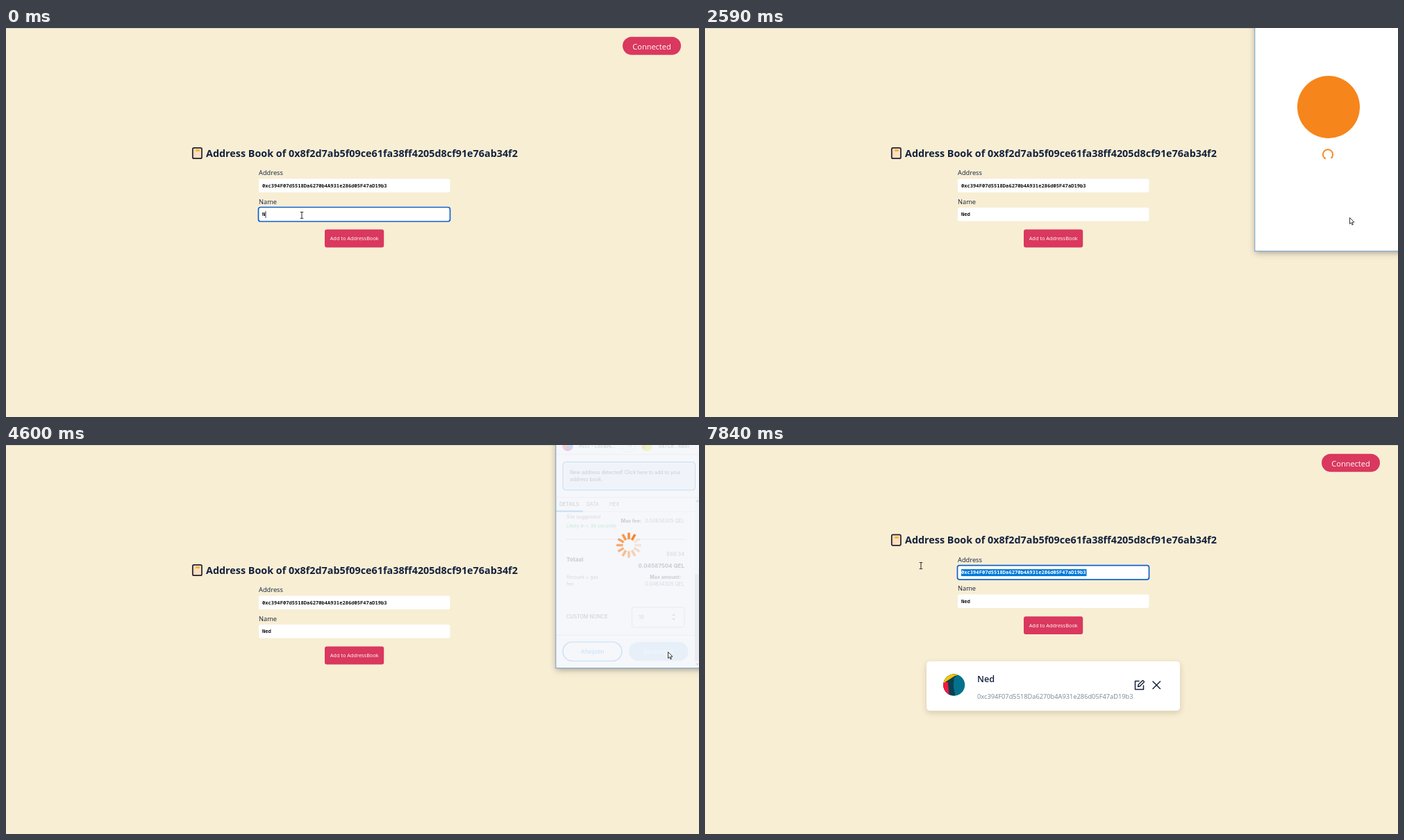
An HTML page with a canvas that plays this animation: 998 px wide and 561 px high, repeating every 7.99 s.

```html
<!DOCTYPE html>
<html lang="en">
<head>
<meta charset="utf-8">
<title>Address Book</title>
<style>
  html, body { margin: 0; width: 100%; height: 100%; overflow: hidden; background: #f8eed4; }
  canvas { display: block; }
</style>
</head>
<body>
<canvas id="stage" width="998" height="561"></canvas>
<script>
const ctx = document.getElementById('stage').getContext('2d');
const LOOP = 7990, TAU = Math.PI * 2;
const SANS = '"Open Sans", "Noto Sans", sans-serif';
const MONO = '600 7.14px "Noto Sans Mono", "DejaVu Sans Mono", monospace';
const INTER = 'Inter, Lato, sans-serif';
const NAVY = '#14213d', PINK = '#da385e', BLUE = '#1c7fd3', ORANGE = '#f6851b';

const OWNER = '0x8f2d7ab5f09ce61fa38ff4205d8cf91e76ab34f2';
const ENTRY = '0xc394F07d5518Da6270b4A931e286d05F47aD19b3';
const NAME = 'Ned';

const AT = { open: 1790, logo: 2180, details: 2740, busy: 4240, close: 4730, saved: 4870, select: 7840 };

// time, x, y, kind: i = text beam, a = arrow, h = hand, - = hidden
const POINTER = [
  [0, 426, 270, 'i'], [670, 430, 272, 'i'], [820, 446, 275, 'i'], [940, 468, 282, 'a'],
  [1090, 488, 296, 'h'], [1240, 495, 302, 'h'],
  [1920, 600, 299, 'a'], [2050, 700, 291, 'a'], [2180, 800, 284, 'a'], [2310, 870, 279, 'a'],
  [2440, 915, 275, 'a'], [2590, 928, 273, 'a'],
  [3110, 937, 274, 'i'], [3410, 942, 280, 'a'], [3560, 950, 292, 'a'], [3710, 953, 298, 'h'],
  [4240, 953, 298, 'a'], [5270, 800, 316, 'a'], [5450, 568, 348, 'a'], [5630, 0, 0, '-'],
  [6780, 128, 218, 'a'], [6930, 220, 210, 'a'], [7080, 330, 203, 'a'], [7230, 440, 195, 'a'],
  [7390, 520, 188, 'i'], [7540, 567, 182, 'i'], [7690, 553, 184, 'i'], [7840, 311, 174, 'i']
];
const SCROLL = [[0, 0], [3110, 40], [3260, 90], [3410, 140], [3560, 167]];

const latest = (list, t) => list.filter(k => k[0] <= t).pop();

function text(str, x, y, font, color, align = 'left') {
  ctx.font = font;
  ctx.fillStyle = color;
  ctx.textAlign = align;
  ctx.fillText(str, x, y);
}

function rect(x, y, w, h, color) {
  ctx.fillStyle = color;
  ctx.fillRect(x, y, w, h);
}

function box(x, y, w, h, r, fill, stroke, width = 1) {
  ctx.beginPath();
  ctx.roundRect(x, y, w, h, r);
  if (fill) { ctx.fillStyle = fill; ctx.fill(); }
  if (stroke) { ctx.strokeStyle = stroke; ctx.lineWidth = width; ctx.stroke(); }
}

function poly(points, fill, stroke, width = 1, closed = true) {
  ctx.beginPath();
  points.forEach(([x, y]) => ctx.lineTo(x, y));
  if (closed) ctx.closePath();
  if (fill) { ctx.fillStyle = fill; ctx.fill(); }
  if (stroke) { ctx.strokeStyle = stroke; ctx.lineWidth = width; ctx.stroke(); }
}

function disc(x, y, r, fill, stroke) {
  ctx.beginPath();
  ctx.arc(x, y, r, 0, TAU);
  ctx.fillStyle = fill;
  ctx.fill();
  if (stroke) { ctx.strokeStyle = stroke; ctx.lineWidth = 1; ctx.stroke(); }
}

function shadowed(color, blur, dy, draw) {
  ctx.save();
  ctx.shadowColor = color;
  ctx.shadowBlur = blur;
  ctx.shadowOffsetY = dy;
  draw();
  ctx.restore();
}

function notebook() {
  box(268.8, 172.8, 13.2, 15.4, 2, '#fbe0c4', '#24202c', 1.7);
  rect(270.2, 174, 1.2, 13, '#f3cdb0');
  box(273, 175.3, 6, 2.8, 1, '#f5b820');
}

function field(y, value, focused, selected, caret) {
  box(364, y, 275.4, 19.5, 2.5, '#fff');
  if (focused) box(363.5, y - 0.5, 276, 20.5, 3, null, '#0f62cf', 1.7);
  if (selected) rect(369, y + 5, 180.5, 10, '#0078d7');
  text(value, 369, y + 12.3, MONO, selected ? '#fff' : '#111');
  if (caret) rect(369.3 + value.length * 4.284, y + 5, 0.8, 10, '#111');
}

function form(t) {
  const typing = t < 1390;
  const typed = t < 120 ? 1 : t < 270 ? 2 : 3;
  const picked = t >= AT.select;
  notebook();
  text('Address Book of ' + OWNER, 288, 185.7, '700 14.36px ' + SANS, NAVY);
  text('Address', 364, 212, '9.3px ' + SANS, NAVY);
  field(217.5, ENTRY, picked, picked, false);
  text('Name', 364, 253.5, '9.3px ' + SANS, NAVY);
  field(259, NAME.slice(0, typed), typing, false, typing);
  box(459, 290.6, 85.2, 25.8, 3, PINK);
  text('Add to AddressBook', 501.7, 306.3, '7.4px ' + SANS, '#fff', 'center');
}

function avatar(x, y) {
  ctx.save();
  ctx.beginPath();
  ctx.arc(x, y, 15.5, 0, TAU);
  ctx.clip();
  ctx.translate(x, y);
  rect(-16, -16, 32, 32, '#04728e');
  poly([[-16, -16], [8, -16], [0, -10], [-1, 2], [2, 16], [-16, 16]], '#0b3f50');
  poly([[-16, -4], [-9, -4], [-7, 16], [-16, 16]], '#f3183f');
  poly([[-16, -16], [14, -16], [1, -13], [-16, -2]], '#f5c400');
  ctx.restore();
}

function card() {
  shadowed('rgba(90,70,20,.22)', 8, 3, () => box(319, 312, 365, 71.3, 5, '#fff'));
  avatar(358.7, 346);
  text(NAME, 392, 342, '600 12.7px ' + SANS, NAVY);
  text(ENTRY, 392, 365.8, '9.28px ' + SANS, '#7a8493');
  ctx.lineCap = ctx.lineJoin = 'round';
  poly([[625, 340.5], [619.5, 340.5], [619.5, 352.5], [631.5, 352.5], [631.5, 347]], null, NAVY, 1.5, false);
  poly([[623.5, 348.5], [624.2, 345.6], [630.4, 339.4], [632.6, 341.6], [626.4, 347.8]], null, NAVY, 1.4);
  poly([[645, 341], [655.5, 351.5]], null, NAVY, 1.5, false);
  poly([[655.5, 341], [645, 351.5]], null, NAVY, 1.5, false);
  ctx.lineCap = 'butt';
  ctx.lineJoin = 'miter';
}

function loading(t) {
  disc(898, 114, 45, ORANGE);
  const turn = (Math.floor((t - AT.logo - 20) / 130) - 3) * 0.82;
  ctx.beginPath();
  ctx.arc(897, 182.3, 7.1, turn + Math.PI * 0.65, turn + Math.PI * 2.28);
  ctx.strokeStyle = ORANGE;
  ctx.lineWidth = 1.9;
  ctx.stroke();
}

function fees() {
  const small = '7px ' + INTER, bold = '700 7px ' + INTER, big = '700 8.1px ' + INTER;
  const dark = '#24272a', grey = '#63686e';
  text('BEWERK', 977, 130, small, BLUE, 'right');
  text('Estimated gas', 807, 153, big, dark);
  text('fee', 807, 164.5, big, dark);
  disc(883, 156, 3.7, '#6a737d');
  text('i', 883, 158.2, '700 6px ' + INTER, '#fff', 'center');
  text('$69.34', 977, 150.5, '7.8px ' + INTER, grey, 'right');
  text('0.045875 QEL', 977, 167, '700 8px ' + INTER, dark, 'right');
  text('Site suggested', 807, 183, 'italic ' + small, grey);
  text('Likely in < 30 seconds', 807, 196, '6.8px ' + INTER, '#28a745');
  text('Max fee:', 915, 189, bold, dark, 'right');
  text('0.04634305 QEL', 977, 189, small, grey, 'right');
  rect(807, 212.5, 170, 1, '#bbc0c5');
  text('Totaal', 807, 245, big, dark);
  text('$69.34', 977, 237, '7.8px ' + INTER, grey, 'right');
  text('0.04587504 QEL', 977, 254, '700 8px ' + INTER, dark, 'right');
  text('Amount + gas', 807, 270, small, grey);
  text('fee', 807, 280, small, grey);
  text('Max amount:', 972, 270, bold, dark, 'right');
  text('0.04634305 QEL', 977, 280, small, grey, 'right');
  text('CUSTOM NONCE', 807, 326.5, '7.2px ' + INTER, dark);
  box(901.5, 311, 75.5, 29, 3, '#fff', '#bbc0c5');
  text('19', 911, 327.5, '7.6px ' + INTER, '#777');
  poly([[959, 323], [961.5, 320.5], [964, 323]], '#888');
  poly([[959, 327], [961.5, 329.5], [964, 327]], '#888');
  rect(792, 351, 200, 1, '#d6d9dc');
}

function buttons(busy) {
  box(802, 361, 85, 27.5, 14, '#fff', BLUE, 1.2);
  text('Afwijzen', 844.5, 377.5, '8.2px ' + INTER, BLUE, 'center');
  box(897, 361, 85.5, 27.5, 14, busy ? '#b8dcf5' : '#037dd6');
  text('Bevestigen', 939.7, 377.5, '8.2px ' + INTER, '#fff', 'center');
}

function scrollbar(scroll) {
  rect(992, 76, 6, 246, '#f3f3f3');
  rect(992, 87 + scroll * 0.595, 6, 125, '#c3c3c3');
  poly([[993.5, 82], [996, 79], [998, 82]], '#555');
  poly([[993.5, 315], [996, 318], [998, 315]], '#555');
}

function details(t) {
  const scroll = latest(SCROLL, t)[1], busy = t >= AT.busy;
  const small = '7px ' + INTER;

  ctx.save();
  ctx.beginPath();
  ctx.rect(792, 76, 206, 246);
  ctx.clip();
  ctx.translate(0, 90 - scroll);
  rect(807, -14, 169, 100, '#f2f3f5');
  box(815, 20, 84, 14, 3, '#fff', '#bbc0c5');
  text('CONTRACTINTERACTIE', 857, 29.5, '6.4px ' + INTER, '#63686e', 'center');
  text('0', 815, 62, '700 14px ' + INTER, '#24272a');
  fees();
  buttons(busy);
  ctx.restore();

  ctx.save();
  ctx.translate(0, Math.max(75, 176.5 - scroll) - 86.5);
  rect(792, 86.5, 200, 21, '#fff');
  rect(792, 107, 200, 1, '#d6d9dc');
  rect(792, 106, 38.5, 2, BLUE);
  text('DETAILS', 797, 99.5, small, '#24272a');
  text('DATA', 836, 99.5, small, '#4a4f55');
  text('HEX', 869, 99.5, small, '#4a4f55');
  ctx.restore();

  rect(792, 0, 206, 76, '#fff');
  rect(792, 13, 206, 1, '#d9dcdf');
  rect(792, 75, 206, 1, '#d9dcdf');
  disc(809, 1, 7.8, '#c8147c');
  poly([[802, 0], [809, 0], [806, 8], [802, 4]], '#f0412f');
  poly([[809, 0], [816, 0], [815, 5], [811, 8]], '#2374e1');
  disc(923, 1, 7.8, '#f8e300');
  poly([[916, 0], [921, 0], [919, 7], [916, 4]], '#f5a800');
  text('Acc1 - LocalN...', 825, 3.6, '7.1px ' + INTER, '#24272a');
  text('0x7Ce...4bd1', 984, 3.6, '7.1px ' + INTER, '#24272a', 'right');
  disc(897, 1, 9.3, '#fff', '#d6d9dc');
  poly([[893, 1], [901, 1], [898, -2], [901, 1], [898, 4]], null, '#aab0b6', 1, false);
  box(802, 24.5, 190.5, 40.5, 4, '#e6f1fb', BLUE);
  text('New address detected! Click here to add to your', 812, 42, small, '#24272a');
  text('address book.', 812, 52, small, '#24272a');
  scrollbar(scroll);
}

function busyCover(t) {
  rect(792, 0, 206, 322, 'rgba(243,246,251,.8)');
  const step = Math.floor((t - AT.busy + 10) / 125) - 2;
  ctx.save();
  ctx.translate(897, 144.5);
  for (let i = 0; i < 12; i++) {
    ctx.save();
    ctx.rotate((1 + step - i) * TAU / 12);
    ctx.globalAlpha = Math.max(0.15, 1 - i / 12);
    box(-1.8, -18, 3.6, 9.5, 0.6, '#f7862a');
    ctx.restore();
  }
  ctx.restore();
}

function popup(t) {
  shadowed('rgba(60,60,60,.45)', 9, 2, () => rect(791.5, -10, 216, 332, '#fff'));
  if (t >= AT.details) details(t);
  else if (t >= AT.logo) loading(t);
  if (t >= AT.busy) busyCover(t);
  rect(791.3, 0, 1, 322, '#6f9cc0');
  rect(791.3, 321.3, 207, 1, '#6f9cc0');
}

function pointer(t) {
  const [, x, y, kind] = latest(POINTER, t);
  ctx.save();
  ctx.translate(x, y);
  if (kind === 'i') {
    rect(-0.5, -4.5, 1, 9, '#222');
    rect(-2.3, -5, 4.6, 0.9, '#222');
    rect(-2.3, 4.2, 4.6, 0.9, '#222');
  } else if (kind === 'a') {
    poly([[0.5, 0.5], [0.5, 9.6], [2.6, 7.7], [4, 11], [5.4, 10.4], [4, 7.2], [6.9, 7.1]], '#fff', '#222', 0.9);
  } else if (kind === 'h') {
    poly([[-1, 0.5], [0.8, 0.5], [1, 4], [5, 5], [6, 6.2], [5.6, 9.5], [4.4, 13],
      [-0.8, 13], [-3.8, 8.5], [-3, 7.4], [-1, 9]], '#fff', '#222', 0.9);
  }
  ctx.restore();
}

function draw(t) {
  rect(0, 0, 998, 561, '#f8eed4');
  rect(0, 0, 998, 1, '#d8d4c5');
  box(888, 12.7, 84, 26, 13, PINK);
  text('Connected', 930, 30.5, '11px ' + SANS, '#fff', 'center');
  ctx.save();
  if (t >= AT.saved) ctx.translate(0, -43.4);
  form(t);
  ctx.restore();
  if (t >= AT.saved) card();
  if (t >= AT.open && t < AT.close) popup(t);
  pointer(t);
}

const start = performance.now();
function tick() {
  draw((performance.now() - start) % LOOP);
  requestAnimationFrame(tick);
}
tick();
</script>
</body>
</html>
```
